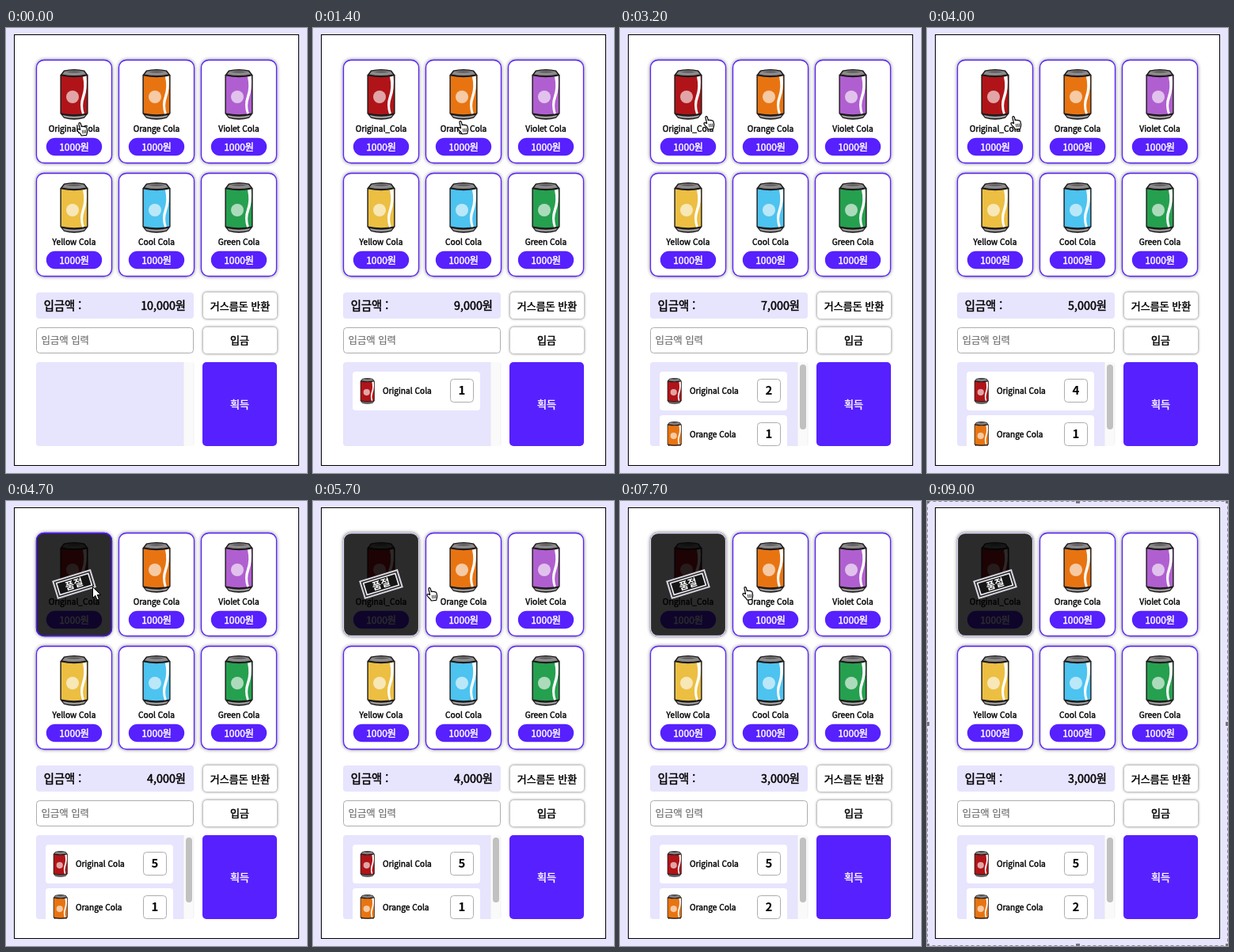
Recreate the animation shown at these times as an HTML page. Size 380x562 px, loop 9100 ms.

```html
<!DOCTYPE html>
<html lang="ko">
<head>
<meta charset="utf-8">
<title>Vending machine</title>
<style>
  html, body { margin: 0; width: 100%; height: 100%; overflow: hidden; background: #e7e4fe; }
  svg { display: block; }
  #stage {
    width: 380px; height: 562px;
    font: 400 13px "Noto Sans CJK KR", "Noto Sans KR", "Noto Sans CJK", "Noto Sans", sans-serif;
  }
  /* A thin outline turns the regular cut into a medium weight */
  text { fill: #000; stroke: #000; stroke-width: .45px; }
  .mid { text-anchor: middle; }
  .end { text-anchor: end; }
  .name { font-size: 10.2px; stroke-width: .4px; }
  .price { font-size: 12px; }
  .balance { font-size: 14.3px; }
  .hint { font-size: 12.4px; fill: #707070; stroke: #707070; stroke-width: .2px; }
  .count { font-size: 15px; font-weight: 700; stroke: none; }
  .light { fill: #fff; stroke: #fff; }
  .stamp { font-size: 12.5px; font-weight: 700; stroke: none; }
  .lavender { fill: #e7e4fe; }
  .purple { fill: #5720ff; }
  .white { fill: #fff; }
  .card { fill: #fff; stroke: #5720ff; stroke-width: 1.3px; filter: drop-shadow(0 0 2px rgba(0, 0, 0, .5)); }
  .button { fill: #fff; stroke: #c4c4c4; filter: drop-shadow(0 0 1.5px rgba(0, 0, 0, .35)); }
  .field { fill: #fff; stroke: #adadad; }
</style>
</head>
<body>
<svg id="stage" viewBox="0 0 380 562">
  <defs>
    <symbol id="can" viewBox="0 0 38 66">
      <path d="M6 2.6Q19-.6 32 2.6L36.6 8.4V57L32 62.8Q19 66.6 6 62.8L1.4 57V8.4Z" fill="#1c1a1a"/>
      <path d="M7 3.8Q19 1.2 31 3.8L34 7.4Q19 10.6 4 7.4Z" fill="#8d8b8c"/>
      <path d="M9 4.4Q19 2.6 29 4.4Q19 6.6 9 4.4Z" fill="#555354"/>
      <path d="M2.8 9.4Q19 13 35.2 9.4V56.4Q19 60 2.8 56.4Z" fill="currentColor"/>
      <path d="M4.4 59Q19 62.6 33.6 59L31.6 61.4Q19 64.4 6.4 61.4Z" fill="#a09e9f"/>
      <path d="M30 10.7Q33 24 29 35Q25 46 29 57.6L31.8 57Q28.4 47 32 37Q36 26 34.6 9.6Z" fill="#fff"/>
      <circle cx="17" cy="36" r="8" fill="#fff" opacity=".62"/>
    </symbol>
    <clipPath id="listClip"><rect x="38" y="422" width="199.5" height="106" rx="4"/></clipPath>
  </defs>

  <rect class="lavender" width="380" height="562"/>
  <rect x="10.5" y="8.5" width="359" height="544" fill="#fff" stroke="#000"/>
  <g id="cards"></g>

  <g id="soldOut">
    <rect x="38" y="40" width="96" height="131" rx="10" opacity=".83"/>
    <rect id="soldEdge" x="38.5" y="40.5" width="95" height="130" rx="9.5" fill="none" stroke-width="1.3"/>
    <g transform="translate(86 105) rotate(-17)">
      <rect x="-24.5" y="-11" width="49" height="22" fill="#2a2a2c" stroke="#d6d4dd" stroke-width="2"/>
      <rect x="-21" y="-7.8" width="42" height="15.6" fill="#161616" stroke="#f1f0f5" stroke-width="1.6"/>
      <text class="stamp mid white" y="4.5">품절</text>
    </g>
  </g>

  <rect class="lavender" x="38" y="334" width="199" height="33" rx="4"/>
  <text class="balance" x="47.8" y="355.8">입금액 :</text>
  <text id="balance" class="balance end" x="227" y="355.8"></text>
  <rect class="button" x="248.5" y="333.5" width="94" height="34" rx="5"/>
  <text class="mid" x="295.5" y="355.6">거스름돈 반환</text>

  <rect class="field" x="38.5" y="378.5" width="198" height="32" rx="4"/>
  <text class="hint" x="44.5" y="398.8">입금액 입력</text>
  <rect class="button" x="248.5" y="377.5" width="94" height="34" rx="5"/>
  <text class="mid" x="295" y="399">입금</text>

  <g clip-path="url(#listClip)">
    <rect class="lavender" x="38" y="422" width="186" height="106"/>
    <rect x="224" y="422" width="14" height="106" fill="#fafafa"/>
    <path d="M224.5 422V528M237 422V528" stroke="#f0f0f0"/>
    <rect id="thumb" x="227" y="425" width="8" height="82" rx="4" fill="#c1c1c1"/>
    <g id="items"></g>
  </g>
  <rect class="purple" x="248" y="422" width="94" height="106" rx="5"/>
  <text class="mid light" x="295" y="479.6">획득</text>

  <g id="hand" stroke="#000" stroke-linejoin="round" stroke-linecap="round">
    <path d="M4.6 9.4L2.9 2.2Q2.7.8 3.9.6Q5 .5 5.3 1.7L6.3 5.6Q7.6 4.6 8.6 5.6Q10 4.8 10.8 6Q12.6 5.6 13 7.4L13.6 10.6Q13.8 13.4 12.6 16.4L6.4 17Q5.6 14.6 2.6 12.4Q.4 10.4 1 9Q2.4 8 4.6 9.4Z" fill="#fff" stroke-width="1.2"/>
    <path d="M7.4 10.4L8 14M9.4 10.2L10 13.8M11.4 10L11.8 13.4" stroke-width=".8"/>
  </g>
  <path id="arrow" d="M.5.5V14.5L3.8 11.4L6 16.8L8.4 15.8L6.2 10.6H10.6Z" fill="#fff" stroke="#000"/>

  <g id="selection">
    <rect x=".5" y=".5" width="379" height="561" fill="none" stroke="#8b8994" stroke-dasharray="4 3"/>
    <path d="M0 0h3v3h-3zM188 0h5v3h-5zM377 0h3v3h-3zM0 279h3v5h-3zM377 279h3v5h-3zM0 559h3v3h-3zM188 559h5v3h-5zM377 559h3v3h-3z" fill="#77757d"/>
  </g>
</svg>
<script>
  const LOOP = 9100, STEP = 100, START = 10000, PRICE = 1000, STOCK = 5;
  const SELECT_AT = 8500;
  const drinks = [
    ['Original_Cola', '#b01418'], ['Orange Cola', '#e87411'], ['Violet Cola', '#b05fd0'],
    ['Yellow Cola', '#ecbf42'], ['Cool Cola', '#4dc3f0'], ['Green Cola', '#25a04f']
  ];
  const clicks = [[100, 2900, 3500, 3900, 4300], [1800, 6500]];

  // Pointer stops: time, x, y
  const stops = [
    [0, 92, 119], [500, 92, 119], [1300, 185, 117], [2200, 185, 117],
    [2800, 108, 111], [4200, 108, 111], [4500, 109, 108], [5200, 109, 108],
    [5700, 146, 109], [6100, 157, 108], [8000, 157, 108], [8700, -20, 180]
  ];

  const el = id => document.getElementById(id);
  const show = (node, on) => { node.style.display = on ? '' : 'none'; };
  const can = (x, y, w, h, color) =>
    `<use href="#can" x="${x}" y="${y}" width="${w}" height="${h}" color="${color}"/>`;

  el('cards').innerHTML = drinks.map(([name, color], i) => {
    const x = 38 + 104 * (i % 3), y = 40 + 143 * Math.floor(i / 3);
    return `<g transform="translate(${x} ${y})">
      <rect class="card" x=".5" y=".5" width="95" height="130" rx="9.5"/>
      ${can(29, 11, 38, 66, color)}
      <text class="name mid" x="48" y="90.8">${name}</text>
      <rect class="purple" x="12.8" y="98.8" width="70.4" height="22.4" rx="11.2"/>
      <text class="price mid light" x="48" y="114.5">1000원</text>
    </g>`;
  }).join('');

  el('items').innerHTML = drinks.slice(0, 2).map(([name, color], i) => `
    <g id="item${i}" transform="translate(50 ${434 + 55 * i})">
      <rect class="white" width="161" height="49" rx="4"/>
      ${can(9, 7.5, 19.5, 34, color)}
      <text class="name" x="38" y="28">${name.replace('_', ' ')}</text>
      <rect class="field" x="123.5" y="9.5" width="29" height="29" rx="4"/>
      <text id="count${i}" class="count mid" x="138" y="29.3"></text>
    </g>`).join('');

  function pointerAt(t) {
    const next = stops.findIndex(s => s[0] > t);
    if (next < 0) return stops[stops.length - 1].slice(1);
    const [t0, x0, y0] = stops[next - 1], [t1, x1, y1] = stops[next];
    const u = (t - t0) / (t1 - t0), k = u * u * (3 - 2 * u);
    return [x0 + (x1 - x0) * k, y0 + (y1 - y0) * k];
  }

  // Column of the top-row card under a point, or -1
  function cardUnder(x, y) {
    const col = Math.floor((x - 38) / 104);
    const inside = x >= 38 && (x - 38) % 104 <= 96 && y >= 40 && y <= 171;
    return inside ? col : -1;
  }

  function draw(t) {
    const counts = clicks.map(times => times.filter(c => c <= t).length);
    counts.forEach((n, i) => {
      show(el('item' + i), n > 0);
      el('count' + i).textContent = n;
    });
    const left = START - PRICE * (counts[0] + counts[1]);
    el('balance').textContent = left.toLocaleString('en-US') + '원';
    show(el('thumb'), counts[1] > 0);

    const [x, y] = pointerAt(t), hover = cardUnder(x, y);
    const sold = counts[0] >= STOCK;
    show(el('soldOut'), sold);
    el('soldEdge').setAttribute('stroke', hover === 0 ? '#5720ff' : '#e4e3e8');

    const canBuy = hover > 0 || (hover === 0 && !sold);
    show(el('hand'), canBuy);
    show(el('arrow'), !canBuy);
    el('hand').setAttribute('transform', `translate(${x - 3} ${y})`);
    el('arrow').setAttribute('transform', `translate(${x} ${y})`);
    show(el('selection'), t >= SELECT_AT);
  }

  const begin = performance.now();
  function tick() {
    const t = (performance.now() - begin) % LOOP;
    draw(Math.floor(t / STEP) * STEP);
    requestAnimationFrame(tick);
  }
  tick();
</script>
</body>
</html>
```
